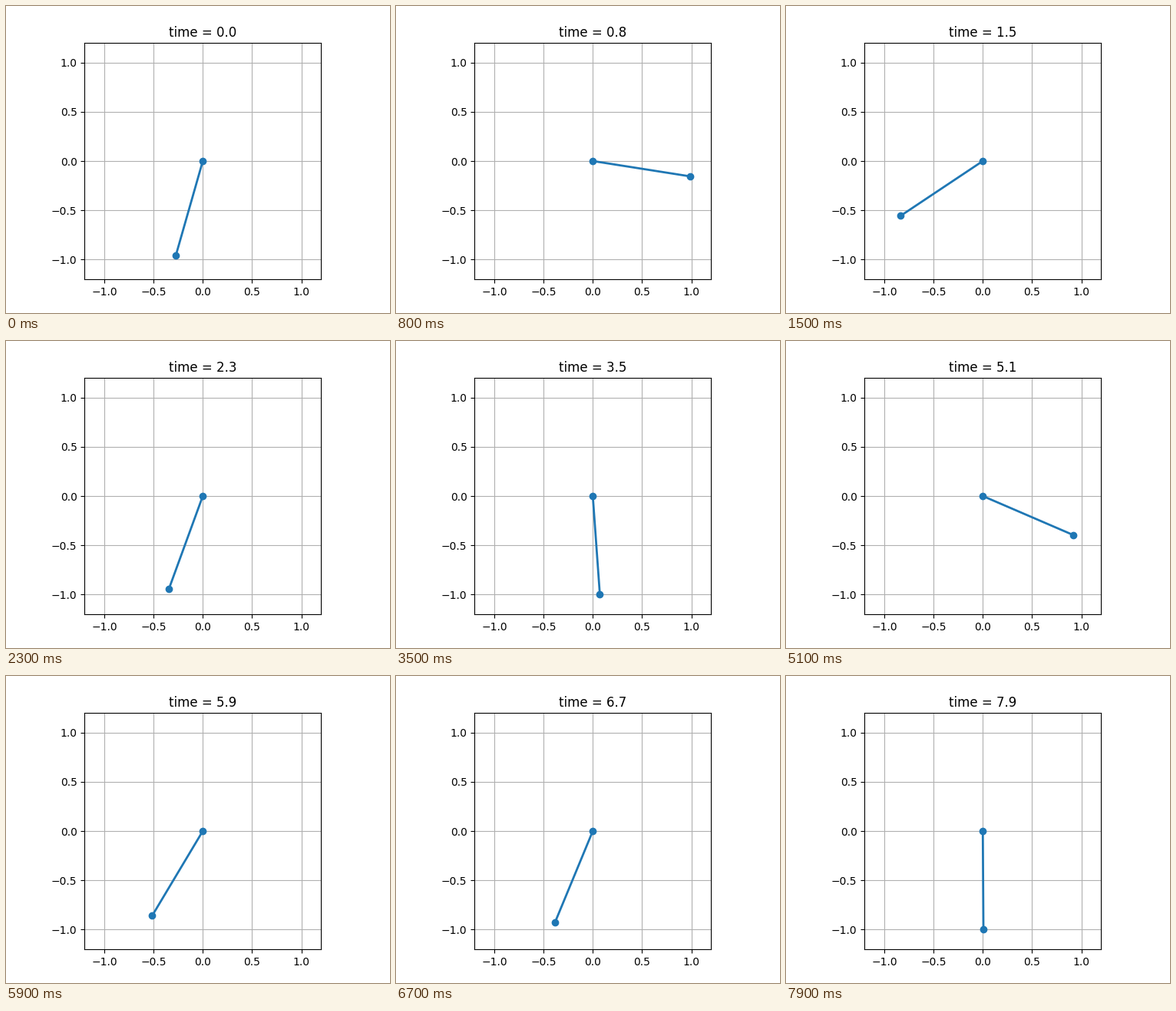
A matplotlib script for the animation above (8000 ms loop, 500 by 400 pixels).

```python
import numpy as np
import matplotlib.pyplot as plt
from matplotlib.animation import FuncAnimation

G, DAMPING, LENGTH = 9.8, 0.1, 1.0
DT, FRAMES, SUBSTEPS = 0.1, 80, 20


def deriv(s):
    theta, omega = s
    return np.array([omega, -G / LENGTH * np.sin(theta) - DAMPING * omega])


def rk4(s, h):
    k1 = deriv(s)
    k2 = deriv(s + h / 2 * k1)
    k3 = deriv(s + h / 2 * k2)
    k4 = deriv(s + h * k3)
    return s + h / 6 * (k1 + 2 * k2 + 2 * k3 + k4)


def simulate(theta, omega):
    """Angles of a damped pendulum, one per frame."""
    s = np.array([theta, omega])
    angles = []
    for _ in range(FRAMES):
        angles.append(s[0])
        for _ in range(SUBSTEPS):
            s = rk4(s, DT / SUBSTEPS)
    return np.array(angles)


angles = simulate(-0.278, 4.405)
xs, ys = LENGTH * np.sin(angles), -LENGTH * np.cos(angles)

fig, ax = plt.subplots(figsize=(5, 4), dpi=100)
ax.set(xlim=(-1.2, 1.2), ylim=(-1.2, 1.2), aspect="equal")
ticks = np.arange(-1, 1.1, 0.5)
ax.set_xticks(ticks)
ax.set_yticks(ticks)
ax.grid()
rod, = ax.plot([], [], "o-", lw=2)
title = ax.set_title("")


def update(i):
    rod.set_data([0, xs[i]], [0, ys[i]])
    title.set_text(f"time = {i * DT:.1f}")
    return rod, title


anim = FuncAnimation(fig, update, frames=FRAMES, interval=1000 * DT,
                     repeat=True, repeat_delay=0)
plt.show()
```
